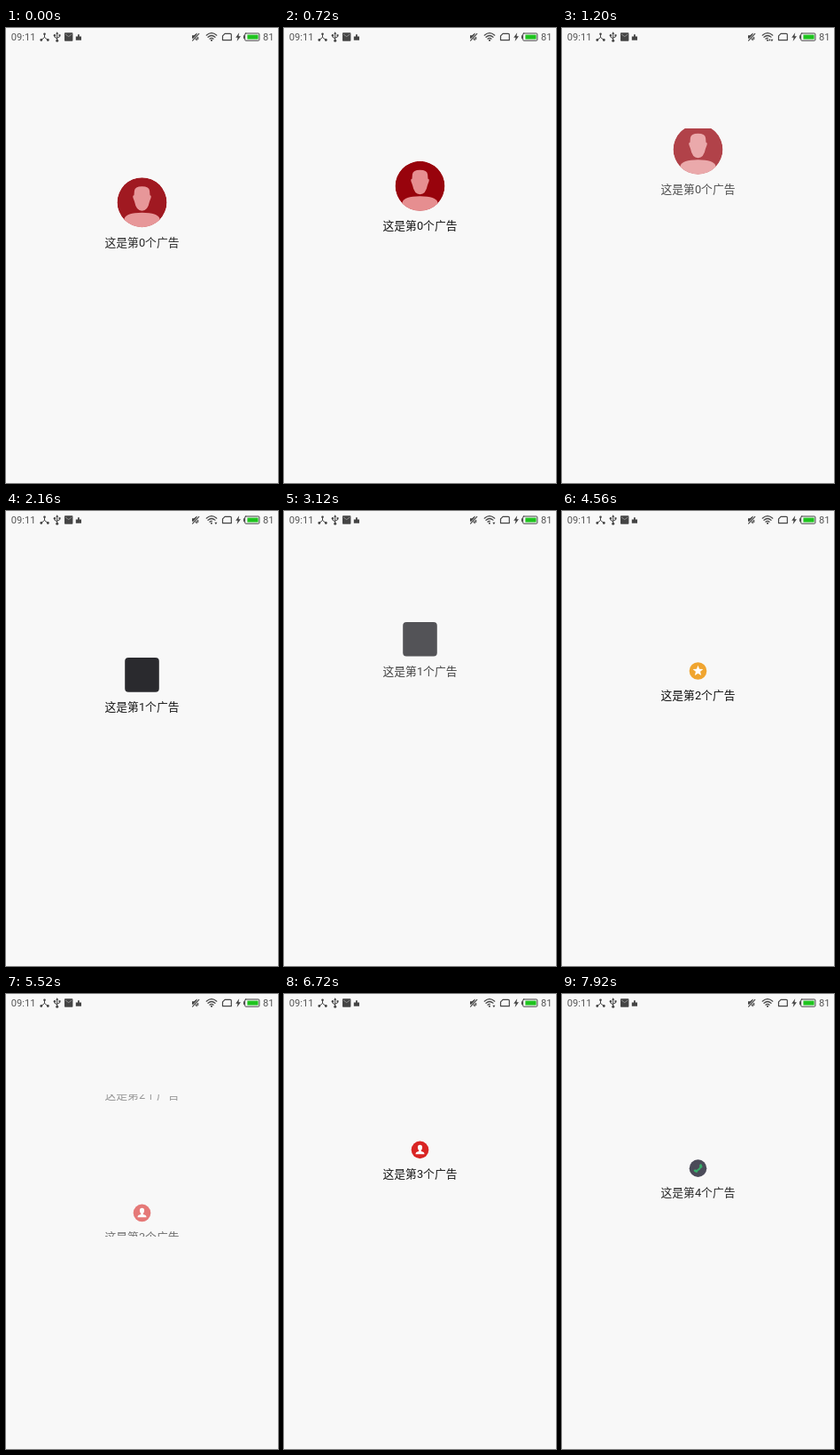
An HTML page for the animation above (8 s loop, 307 px wide and 512 px high).

```html
<!DOCTYPE html>
<html lang="zh">
<head>
<meta charset="utf-8">
<title>Vertical ad flipper</title>
<style>
html, body { margin: 0; width: 100%; height: 100%; overflow: hidden; background: #f8f8f8; }
svg { display: block; width: 100%; height: 100%; }
text { font-family: Roboto, "Noto Sans CJK SC", "Noto Sans CJK", sans-serif; }
.clock { font-size: 11.1px; fill: #555; }
.label { font-size: 12.8px; fill: #111; text-anchor: middle; }
.line { fill: none; stroke: #444; stroke-linecap: round; stroke-linejoin: round; }
</style>
</head>
<body>
<svg viewBox="0 0 307 512">
  <defs>
    <clipPath id="window"><rect x="100" y="113" width="107" height="160"/></clipPath>
    <clipPath id="disc"><circle r="28"/></clipPath>
  </defs>
  <rect width="307" height="512" fill="#f8f8f8"/>

  <g id="status" fill="#444">
    <text class="clock" x="5.8" y="14">09:11</text>
    <path class="line" d="M43.5 10.5V7M43.5 10.5L40 13.3M43.5 10.5L47 13.3"/>
    <circle cx="43.5" cy="6.8" r="1.3"/><circle cx="39.8" cy="13.5" r="1.4"/><circle cx="47.3" cy="13.5" r="1.4"/>
    <path class="line" d="M57.7 6V14M54.9 8.5V10.2L57.7 12M60.6 8.3V9.8L57.7 11.2"/>
    <path d="M57.7 4.3L59.3 6.8H56.1ZM59.5 7.3h2v2h-2Z"/>
    <circle cx="54.9" cy="8.3" r="1.2"/><circle cx="57.7" cy="14.3" r="1.5"/>
    <rect x="66" y="5.2" width="9.4" height="9.6" rx=".8"/>
    <path d="M67 7L70.7 9.6L74.4 7" fill="none" stroke="#aaa" stroke-width=".7"/>
    <path d="M78.8 9.6h2.2V7.3h1.8v2.3h2.2v4.2h-6.2Z"/>

    <path d="M210 8.2h2.2L215.6 5.4V14.6L212.2 11.8H210Z"/>
    <path d="M210.3 14.6L218 6.2" stroke="#f8f8f8" stroke-width="2.2"/>
    <path class="line" d="M210.6 14.2L217.8 6.3M216.7 10.3V12.6" stroke-width="1.1"/>
    <path class="line" d="M226.2 8.2Q232 3 237.8 8.2M228 10.3Q232 6.7 236 10.3M229.9 12.2Q232 10.4 234.1 12.2" stroke-width="1.2"/>
    <circle cx="232" cy="13.8" r="1.1"/>
    <g id="traffic">
      <rect x="232.8" y="10.8" width="6" height="5" fill="#f8f8f8"/>
      <path id="upload" d="M233 14.2L234.3 12L235.6 14.2Z"/>
      <path d="M235.4 12.8h3L236.9 15.2Z"/>
    </g>
    <path class="line" d="M247 6.3H253.2Q254.3 6.3 254.3 7.4V13.7H244.5V8.9Z" stroke-width="1.2"/>
    <path d="M263.2 5.2L259.2 10.8H261.6L260.6 15L265 9.2H262.5Z"/>
    <rect class="line" x="269.7" y="6" width="16.2" height="8.2" rx="1"/>
    <rect x="268" y="8.3" width="1.4" height="3.6"/>
    <rect x="272.4" y="7.6" width="12.2" height="5" fill="#1fc41f"/>
    <text class="clock" x="290" y="14">81</text>
  </g>
  <g id="belt" clip-path="url(#window)"></g>
</svg>
<script>
const LOOP = 8000, TICK = 240;
const START = 590, PERIOD = 1980, SLIDE = 1750;
const HEIGHT = 160, CX = 153.5, CY = 193;

const disc = (fill, inner) => `<circle r="9.8" fill="${fill}"/>${inner}`;

const star = Array.from({ length: 10 }, (_, i) => {
  const a = i * Math.PI / 5, r = i % 2 ? 2.7 : 6.2;
  return `${(r * Math.sin(a)).toFixed(2)},${(-r * Math.cos(a)).toFixed(2)}`;
}).join(' ');

const avatar = `<g clip-path="url(#disc)">
  <circle r="28" fill="#970009"/>
  <g fill="#e68d8f">
    <path d="M-8.6 -13Q-8 -18 0 -18Q8 -18 8.6 -13L9 -8Q10.8 -8 10 -5L8.5 -1Q6.5 9.5 0 9.5Q-6.5 9.5 -8.5 -1L-10 -5Q-10.8 -8 -9 -8Z"/>
    <path d="M-20 30V18.5Q-18 11.5 0 11.5Q18 11.5 20 18.5V30Z"/>
  </g></g>`;

// icon: artwork, y: icon centre, textY: label centre, both from the slot centre
const items = [
  { icon: avatar, y: -13, textY: 32 },
  { icon: '<rect x="-19.3" y="-19.3" width="38.6" height="38.6" rx="4" fill="#252529"/>', y: -12.8, textY: 23 },
  { icon: disc('#f0a530', `<polygon points="${star}" fill="#fff"/>`), y: -13, textY: 14 },
  { icon: disc('#d9201f', `<path fill="#fff" d="M0 -5.6Q2.7 -5.6 2.6 -2.6Q2.4 -.4 1.3 .7V1.6Q5 2.2 5 4.8H-5Q-5 2.2 -1.3 1.6V.7Q-2.4 -.4 -2.6 -2.6Q-2.7 -5.6 0 -5.6Z"/>`), y: -13, textY: 14 },
  { icon: disc('#383848', `<path fill="none" stroke="#22a65a" stroke-width="1.9" d="M3.2 -2.6Q2.4 1.8 -2.8 3"/>
    <path fill="none" stroke="#22a65a" stroke-width="2.8" stroke-linecap="round" d="M3 -3.4L3.6 -1.7M-3.4 2.7L-1.7 3.4"/>`), y: -13, textY: 14 },
];

const belt = document.getElementById('belt');
const traffic = document.getElementById('traffic');
const upload = document.getElementById('upload');

belt.innerHTML = items.map(({ icon, y, textY }, i) => `<g>
  <g transform="translate(0 ${y})">${icon}</g>
  <text class="label" y="${textY + 4.6}">这是第${i}个广告</text></g>`).join('');
const slots = [...belt.children];

const ease = x => (1 - Math.cos(Math.PI * x)) / 2;
const within = (t, a, b) => t >= a && t < b;
const show = (el, on) => el.setAttribute('visibility', on ? 'visible' : 'hidden');

function draw(ms) {
  const t = Math.floor(ms % LOOP / TICK) * TICK;
  const turn = Math.floor((t - START) / PERIOD);
  const since = t - START - turn * PERIOD;
  const pos = turn + ease(Math.min(1, since / SLIDE));

  slots.forEach((slot, i) => {
    const d = i - pos;
    slot.setAttribute('transform', `translate(${CX} ${(CY + d * HEIGHT).toFixed(2)})`);
    slot.setAttribute('opacity', Math.max(0, 1 - Math.abs(d)).toFixed(3));
  });

  const busy = within(t, 960, 4080) || within(t, 6480, 7440);
  show(traffic, busy);
  show(upload, busy && t < 1680);
}

const begin = performance.now();
function loop() {
  draw(performance.now() - begin);
  requestAnimationFrame(loop);
}
loop();
</script>
</body>
</html>
```
